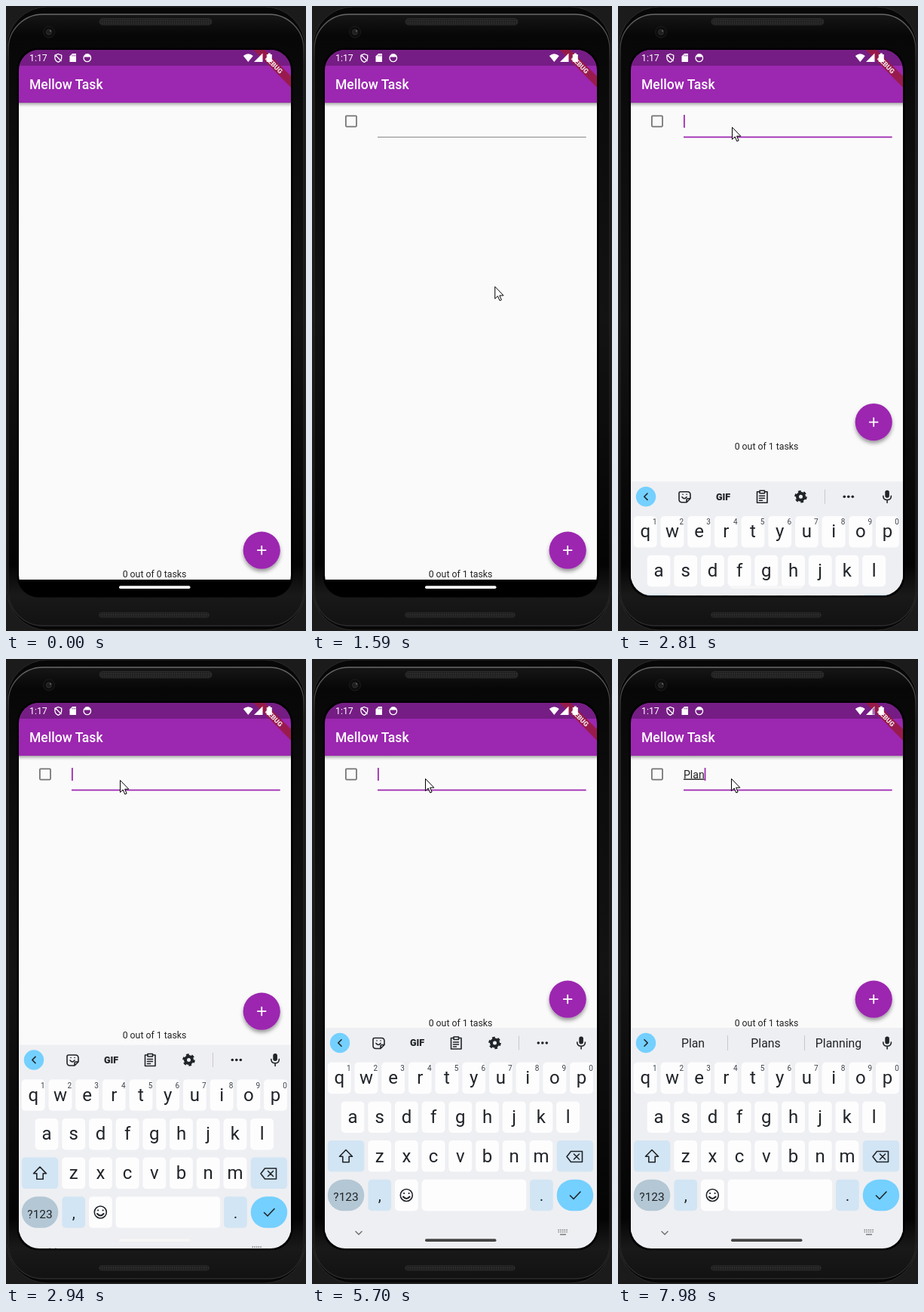
Write an HTML page that moves like this. It is 398 px wide and 827 px high and loops after 8000 ms.

```html
<!DOCTYPE html>
<html lang="en">
<head>
<meta charset="utf-8">
<title>Task list</title>
<style>
html, body { margin: 0; height: 100%; overflow: hidden; background: #1b1b1c; }
svg { display: block; width: 100vw; height: 100vh; }
text { font-family: Roboto, Arial, sans-serif; white-space: pre; }
.mid { text-anchor: middle; }
.line { fill: none; stroke: #202428; stroke-width: 1.6; stroke-linejoin: round; stroke-linecap: round; }
</style>
</head>
<body>
<svg viewBox="0 0 398 827">
  <defs>
    <clipPath id="screen"><rect x="17" y="58" width="361" height="722" rx="27"/></clipPath>
    <clipPath id="fabClip"><circle cx="339.2" cy="720.2" r="24.6"/></clipPath>
    <linearGradient id="body" x2="0" y2="1">
      <stop offset="0" stop-color="#161616"/><stop offset=".035" stop-color="#070707"/>
      <stop offset=".15" stop-color="#0b0b0b"/><stop offset=".5" stop-color="#131313"/>
      <stop offset=".9" stop-color="#040404"/><stop offset=".95" stop-color="#191919"/>
      <stop offset="1" stop-color="#121212"/>
    </linearGradient>
    <linearGradient id="rim" x2="0" y2="1">
      <stop offset="0" stop-color="#686868"/><stop offset=".08" stop-color="#2c2c2c"/>
      <stop offset=".9" stop-color="#1e1e1e"/><stop offset="1" stop-color="#2c2c2c"/>
    </linearGradient>
    <linearGradient id="barShade" x2="0" y2="1">
      <stop offset="0" stop-opacity=".34"/><stop offset=".5" stop-opacity=".12"/><stop offset="1" stop-opacity="0"/>
    </linearGradient>
    <pattern id="mesh" width="3" height="3" patternUnits="userSpaceOnUse">
      <rect width="3" height="3" fill="#1e1e1e"/><circle cx="1.5" cy="1.5" r=".9" fill="#343434"/>
    </pattern>
    <filter id="lift" x="-40%" y="-40%" width="180%" height="190%">
      <feDropShadow dx="0" dy="3.5" stdDeviation="2.8" flood-opacity=".38"/>
    </filter>
  </defs>

  <!-- Phone shell -->
  <rect width="398" height="827" fill="#1b1b1c"/>
  <rect x="1" y="1" width="396" height="825" rx="54" fill="#070707" stroke="#2c2c2c"/>
  <rect x="3" y="11" width="392" height="809" rx="46" fill="url(#body)" stroke="url(#rim)" stroke-width="1.3"/>
  <rect x="14.5" y="55.500" width="366" height="727" rx="29" fill="#000"/>
  <rect x="124" y="16.5" width="149" height="8.5" rx="4.2" fill="url(#mesh)" stroke="#2b2b2b"/>
  <rect x="123.5" y="802.5" width="146" height="6.5" rx="3.2" fill="url(#mesh)" stroke="#242424"/>
  <circle cx="57" cy="34.5" r="7.5" fill="#0d0d0d" stroke="#1c1c1c"/>
  <circle cx="57" cy="34.5" r="3.5" fill="#1e1e1e" stroke="#303030"/>
  <circle cx="59" cy="33" r="1.2" fill="#555"/>

  <g clip-path="url(#screen)">
    <rect x="17" y="128" width="361" height="632" fill="#fafafa"/>
    <rect x="17" y="128" width="361" height="6" fill="url(#barShade)"/>
    <rect x="17" y="58" width="361" height="70" fill="#9c27b0"/>
    <rect x="17" y="58" width="361" height="21" fill="#751d84"/>
    <text x="31" y="110" font-size="17.56" font-weight="500" fill="#fff">Mellow Task</text>
    <g transform="translate(378 58) rotate(45)">
      <rect x="-45" y="24.6" width="90" height="10.5" fill="#9a1b45" opacity=".92"/>
      <text class="mid" x="-2" y="33" font-size="8.9" font-weight="900" fill="#fff" opacity=".88">DEBUG</text>
    </g>

    <!-- Status icons -->
    <g fill="#fff">
      <text x="31" y="73" font-size="12.3">1:17</text>
      <path d="M69.3 63.5l4.4 1.7v3.4q0 3.8-4.4 5.7q-4.4-1.9-4.4-5.7v-3.4zM65 64.5l8.5 8.5" fill="none" stroke="#fff" stroke-width="1.3"/>
      <path d="M84.5 66.5l3.5-3.5h5v11h-8.5z"/>
      <path d="M88 64.5v2M90 64.5v2M91.8 64.5v2" stroke="#751d84" stroke-width=".8"/>
      <circle cx="107.8" cy="68.8" r="4.8" fill="none" stroke="#fff" stroke-width="1.3"/>
      <path d="M103.5 67.5h8.600v-2l-2-2h-4.600z"/>
      <path d="M314.8 66q6.5-5.5 13 0l-6.5 8z"/>
      <path d="M340.5 62.5v11.5h-11.5z"/>
      <path id="weak" d="M337.5 66.5l3-3v10h-3z" fill="#751d84" opacity=".65"/>
      <path d="M347.8 62.5h3v1.5h2v10h-7v-10h2z"/>
    </g>

    <!-- Task row -->
    <g id="task">
      <rect x="44.9" y="145.4" width="14.1" height="14.1" rx=".9" fill="none" stroke="#757575" stroke-width="1.75"/>
      <rect id="rule" x="87" width="276.700"/>
      <text id="typed" x="87" y="157.5" font-size="14.04" fill="#212121" text-decoration="underline"></text>
      <rect id="caret" y="144" width="1.75" height="17" fill="#9c27b0"/>
    </g>

    <g id="foot">
      <text id="count" class="mid" x="197" y="756.3" font-size="12.29" fill="#222"></text>
      <circle cx="339.2" cy="720.2" r="24.6" fill="#9c27b0" filter="url(#lift)"/>
      <circle id="ripple" cx="346" cy="718" fill="#fff" clip-path="url(#fabClip)"/>
      <path d="M339.2 714.1v12.2M333.1 720.2h12.2" stroke="#fff" stroke-width="1.8"/>
    </g>
    <rect x="17" y="759" width="361" height="22" fill="#000"/>

    <g id="board">
      <rect x="17" y="488" width="361" height="700" fill="#eeeff2"/>
      <circle cx="37" cy="508" r="13.2" fill="#74d0ff"/>
      <path id="arrow" class="line" stroke-width="2"/>
      <g id="tools">
        <path class="line" d="M83 501.5h9q4 0 4 4v5l-5 5h-6q-4 0-4-4v-8q0-2 2-2zM91 515.5v-3q0-2 2-2h3M85 508.5q3 4 6 0M86 505h.1M91 505h.1"/>
        <text class="mid" x="139.5" y="512.3" font-size="12.5" font-weight="900" fill="#202428">GIF</text>
        <path class="line" d="M188 501.5h-3.5v14.5h13.5v-14.5h-3.5M188 500h6.5v3.5h-6.5zM187.5 507h7M187.5 510h7M187.5 513h4"/>
        <circle cx="242.5" cy="508" r="4.5" fill="none" stroke="#202428" stroke-width="4"/>
        <circle cx="242.5" cy="508" r="7" fill="none" stroke="#202428" stroke-width="2.6" stroke-dasharray="3.7 3.63"/>
        <path d="M274.5 498.5v19" stroke="#c5c8cc"/>
        <g fill="#202428"><circle cx="300.3" cy="508" r="1.8"/><circle cx="305.8" cy="508" r="1.8"/><circle cx="311.3" cy="508" r="1.8"/></g>
      </g>
      <g id="hints">
        <path d="M145.5 498v20M247.5 498v20" stroke="#c5c8cc"/>
      </g>
      <rect x="354.3" y="499.5" width="5.6" height="10" rx="2.8" fill="#202428"/>
      <path class="line" d="M351.8 507q0 5.3 5.3 5.3t5.3-5.3M357.1 512.5v3.5"/>
      <g id="keys"></g>
      <g class="line">
        <path d="M45 649.5l8.5 8.8h-4.3v7.5h-8.4v-7.5h-4.3z"/>
        <path d="M343.5 651.5h15v14h-15l-5.5-7zM347.5 655l7 7M354.5 655l-7 7"/>
        <circle cx="125.3" cy="709.5" r="8"/>
        <path d="M122 707h.2M128.5 707h.2M121 711.5q4.3 5 8.6 0" stroke-width="2"/>
        <path d="M342.5 710l4.5 4.5l9-9.5"/>
        <path d="M58 757.5l4 4l4-4" stroke="#777"/>
      </g>
      <g stroke="#777" stroke-width="1.3" stroke-dasharray="1.5 1.2">
        <path d="M326.5 755.5h13.5M326.5 758.2h13.5"/><path d="M329 761.5h8" stroke-dasharray="none"/>
      </g>
    </g>
    <rect id="handle" x="150" y="767.3" width="94.5" height="3.7" rx="1.8"/>
  </g>
  <path id="mouse" d="M.5.5V16.5l3.7-3.5 2.6 6 2.3-1-2.5-5.8h5.2z" fill="#fff" stroke="#000"/>
</svg>
<script>
const $ = id => document.getElementById(id);
const set = (id, attrs) => Object.entries(attrs).forEach(([k, v]) => $(id).setAttribute(k, v));
const show = (id, on) => set(id, { visibility: on ? 'visible' : 'hidden' });
const clamp = v => Math.max(0, Math.min(1, v));

function add(parent, tag, attrs, label = '') {
  const el = document.createElementNS('http://www.w3.org/2000/svg', tag);
  for (const k in attrs) el.setAttribute(k, attrs[k]);
  el.textContent = label;
  return $(parent).appendChild(el);
}
function key(x, y, w, fill = '#fdfdfe', label = '', size = 24, rx = 5) {
  add('keys', 'rect', { x, y, width: w, height: 41.5, rx, fill });
  add('keys', 'text', { x: x + w / 2, y: y + 28.5, class: 'mid', 'font-size': size, fill: '#202428' }, label);
}

// Keyboard layout
const PITCH = 35.7, ROW = 51.7, TOP = 533.7, PALE = '#d2e5f4';
[['qwertyuiop', 20.8], ['asdfghjkl', 38.6], ['zxcvbnm', 74.3]].forEach(([row, x0], r) =>
  [...row].forEach((c, i) => {
    key(x0 + i * PITCH, TOP + r * ROW, 30.8, undefined, c);
    if (!r) add('keys', 'text', { x: 48.7 + i * PITCH, y: 545, class: 'mid', 'font-size': 10, fill: '#3c4248' }, (i + 1) % 10);
  }));
const row3 = TOP + 2 * ROW, row4 = TOP + 3 * ROW;
key(20.8, row3, 48.5, PALE);
key(324.7, row3, 48.5, PALE);
key(20.8, row4, 48.5, '#b3c7d5', '?123', 15.5, 20.7);
key(74.3, row4, 30.8, PALE, ',', 21);
key(110, row4, 30.8);
key(145.7, row4, 138.5);
key(289, row4, 30.8, PALE, '.', 21);
key(324.7, row4, 48.5, '#74d0ff', '', 24, 20.7);

const hintText = [99.5, 196, 292.5].map(x =>
  add('hints', 'text', { x, y: 514, class: 'mid', 'font-size': 15.8, fill: '#202428' }));

// Timeline: [time, ...values]
const PATH = [[390, 392, 818], [730, 347, 717], [1190, 347, 717], [1590, 242, 370], [1860, 313, 597],
  [2400, 154, 171], [2610, 154, 171], [2740, 151, 160], [2940, 151, 160], [3150, 150, 158]];
const TYPING = [[0, ''], [6160, 'P', 'P', 'Please', 'Possible'], [6430, 'Pl', 'Pl', 'Please', 'Play'],
  [6900, 'Pla', 'Pla', 'Play', 'Plan'], [7430, 'Plan', 'Plan', 'Plans', 'Planning']];
const HANDLE = [[0, '#fff'], [2740, '#f6f6f7'], [3150, '#d0d0d1'], [3500, '#aaa'], [4200, '#888'], [4480, '#666'], [4690, '#444']];
const CARET = [[0, 0], [2680, 1], [3150, 0], [3640, 1], [4130, 0], [4690, 1], [5160, 0], [5700, 1]];

const at = (list, t) => list.filter(k => k[0] <= t).pop();
function along(path, t) {
  const i = path.findIndex(p => p[0] > t);
  if (i < 0) return path.at(-1).slice(1);
  if (!i) return path[0].slice(1);
  const [a, b] = [path[i - 1], path[i]], u = (t - a[0]) / (b[0] - a[0]);
  return [a[1] + (b[1] - a[1]) * u, a[2] + (b[2] - a[2]) * u];
}

function draw(t) {
  show('mouse', t >= 390);
  set('mouse', { transform: `translate(${along(PATH, t)})` });

  const added = t >= 1190, focused = t >= 2740;
  show('task', added);
  $('count').textContent = `0 out of ${+added} tasks`;
  set('rule', focused ? { y: 172.6, height: 1.75, fill: '#9c27b0' } : { y: 173, height: 1, fill: '#898989' });

  const press = t - 1060;
  set('ripple', { r: 8 + 40 * clamp(press / 300), opacity: press < 0 ? 0 : .25 * clamp((500 - press) / 250) });

  const rise = 1 - (1 - clamp((t - 2700) / 395)) ** 3;
  set('foot', { transform: `translate(0 ${-270 * rise})` });
  set('board', { transform: `translate(0 ${380 * (1 - rise)})` });
  set('handle', { fill: at(HANDLE, t)[1] });

  const [, word, ...hints] = at(TYPING, t);
  $('typed').textContent = word;
  set('caret', { x: 87 + (word ? $('typed').getComputedTextLength() : 0), opacity: at(CARET, t)[1] });
  show('tools', !word);
  show('hints', word);
  hintText.forEach((el, i) => el.textContent = hints[i] || '');
  set('arrow', { d: word ? 'M35 503.8l4.2 4.2l-4.2 4.2' : 'M39 503.8l-4.2 4.2l4.2 4.2' });
  show('weak', t >= 7900);
}

const start = performance.now();
function frame() {
  draw((performance.now() - start) % 8000);
  requestAnimationFrame(frame);
}
frame();
</script>
</body>
</html>
```
